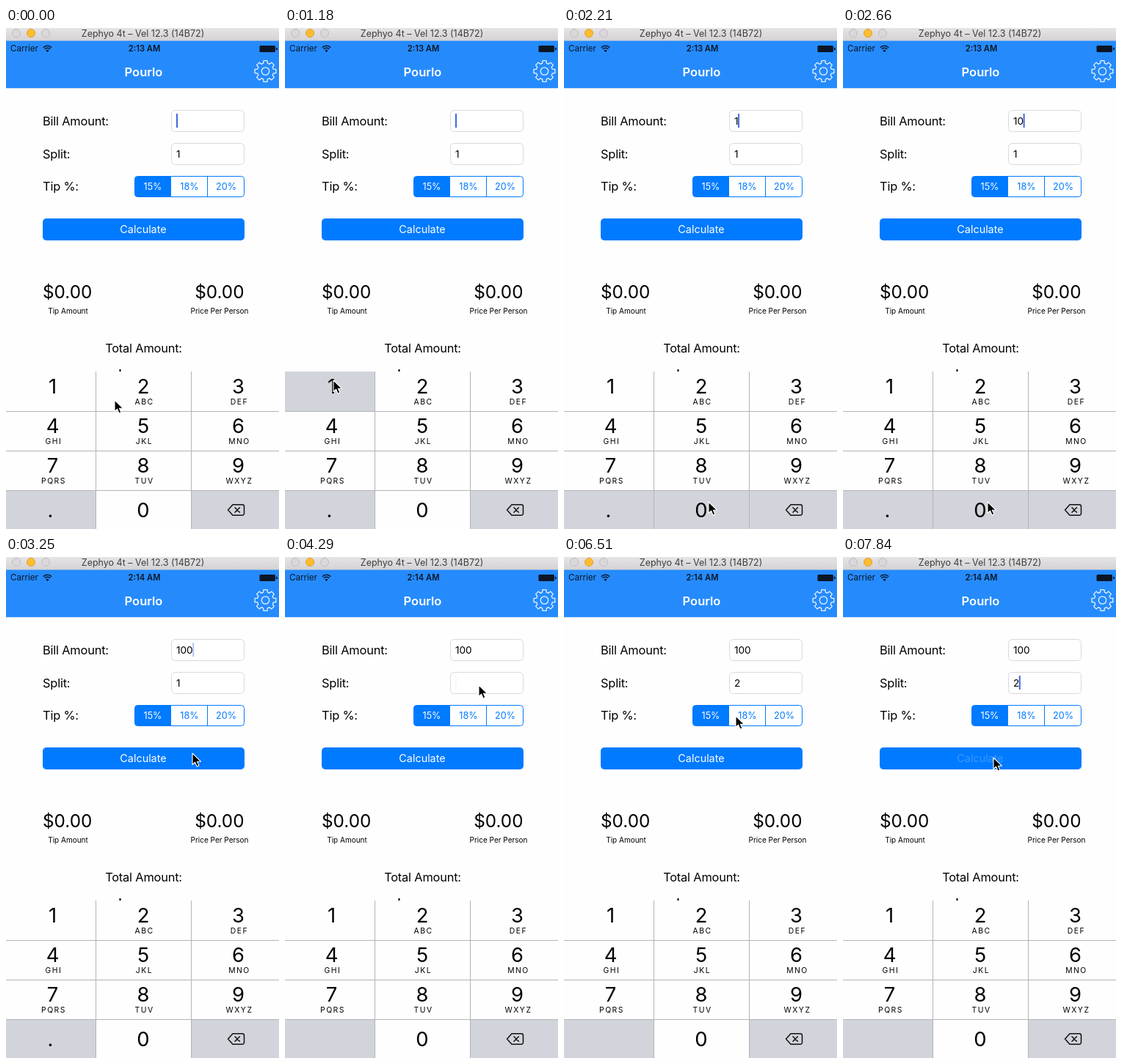
Recreate the animation shown at these times as an HTML page. Size 372x684 px, loop 8 s.

```html
<!DOCTYPE html>
<html lang="en">
<head>
<meta charset="utf-8">
<style>
  html, body { margin: 0; width: 100%; height: 100%; overflow: hidden; background: #fefefe; }
  svg { display: block; width: 372px; height: 684px; font-family: Inter, "Open Sans", sans-serif; }
  .label { font-size: 16.4px; letter-spacing: -.012em; }
  .mid { text-anchor: middle; }
  .box { fill: #fff; stroke: #d9d9d9; }
  .value { font-size: 13.6px; }
  .tab { font-size: 12.6px; fill: #007aff; }
  .money { font-size: 24.3px; }
  .small { font-size: 10px; }
  .digit { font-size: 27.4px; }
  .letters { font-size: 10.4px; letter-spacing: 1.5px; }
</style>
</head>
<body>
<svg viewBox="0 0 372 684">
  <defs>
    <linearGradient id="chrome" x2="0" y2="1">
      <stop stop-color="#e6e4e6"/><stop offset="1" stop-color="#d3d1d3"/>
    </linearGradient>
  </defs>
  <rect width="372" height="684" fill="#fefefe"/>

  <rect width="372" height="18" fill="url(#chrome)"/>
  <g fill="#dad8da" stroke="#bfbdbf">
    <circle cx="14" cy="7" r="5.5"/>
    <circle cx="34" cy="7" r="5.5" fill="#fdbd30" stroke="#e0a028"/>
    <circle cx="54" cy="7" r="5.5"/>
  </g>
  <text class="mid" x="186.5" y="12" font-size="12.5" fill="#3f3f3f">Zephyo 4t – Vel 12.3 (14B72)</text>

  <rect y="17.5" width="372" height="64.5" fill="#258bfd"/>
  <rect y="82" width="372" height=".5" fill="#b4cdea"/>
  <g fill="#0a1626">
    <text x="6" y="32" font-size="11.6">Carrier</text>
    <text id="clock" class="mid" x="188.5" y="32" font-size="11.2" font-weight="600"></text>
    <path d="M56.5 33l-2.1-2.3a3 3 0 0 1 4.2 0z"/>
    <path d="M52.7 28.8a5.4 5.4 0 0 1 7.6 0M50.8 26.7a8 8 0 0 1 11.4 0" fill="none" stroke="#0a1626" stroke-width="1.6"/>
    <rect x="345.5" y="24" width="21.5" height="9" rx="1.5"/>
    <rect x="368" y="26.7" width="1.8" height="3.6" rx=".8"/>
  </g>
  <text class="mid" x="187.5" y="66" font-size="16.5" font-weight="600" fill="#fff">Pourlo</text>
  <g transform="translate(353.5 59)" fill="none" stroke="#e9f3ff" stroke-width="1.3" stroke-linejoin="round">
    <path id="gear"/><circle r="5.2"/>
  </g>

  <g class="label">
    <text x="50" y="133">Bill Amount:</text>
    <text x="50" y="178">Split:</text>
    <text x="50" y="222">Tip %:</text>
    <text class="mid" x="187.5" y="443">Total Amount:</text>
  </g>
  <rect class="box" x="225.5" y="112.5" width="99" height="29" rx="5"/>
  <rect class="box" x="225.5" y="157.5" width="99" height="29" rx="5"/>
  <text id="bill" class="value" x="232" y="132"></text>
  <text id="split" class="value" x="232" y="177"></text>
  <rect id="caret" width="2" height="19" fill="#4268dc"/>

  <rect x="175.5" y="202.5" width="149" height="28" rx="4" fill="#fff" stroke="#007aff"/>
  <path d="M225 202.5h-45.500a4 4 0 0 0-4 4v20a4 4 0 0 0 4 4H225z" fill="#007aff"/>
  <path d="M274.500 203v27" stroke="#007aff"/>
  <g class="tab mid">
    <text x="200" y="221" fill="#fff" style="fill:#fff">15%</text>
    <text x="250" y="221">18%</text>
    <text x="300" y="221">20%</text>
  </g>

  <rect x="50" y="260" width="275" height="30" rx="5" fill="#007aff"/>
  <text id="calc" class="mid" x="187" y="280" font-size="14.4" fill="#fff">Calculate</text>

  <text class="money" x="50" y="369">$0.00</text>
  <text class="money" x="324.500" y="369" text-anchor="end">$0.00</text>
  <g class="small mid">
    <text x="84.500" y="389.500">Tip Amount</text>
    <text x="291" y="389.500">Price Per Person</text>
  </g>
  <rect x="154.500" y="466" width="2" height="3"/>

  <g id="keypad"></g>
  <g fill="none" stroke="#111" stroke-width="1.5" stroke-linejoin="round" stroke-linecap="round">
    <path d="M302.500 658l6.500-7.200h13a2.500 2.500 0 0 1 2.500 2.500v9.400a2.500 2.500 0 0 1-2.500 2.500h-13z"/>
    <path d="M312 654.800l6.400 6.400m0-6.400l-6.400 6.400"/>
  </g>
  <path id="pointer" d="M0 0v15.500l3.600-3.300 2.500 5.700 2.800-1.200-2.500-5.500h5z" stroke="#fff" stroke-width="1.100" stroke-linejoin="round"/>
</svg>
<script>
const LOOP = 8000, STEP = 148.15;
const $ = id => document.getElementById(id);
const GRAY = '#d1d4da';

// pointer stops: time, x, y
const stops = [
  [30, 148, 508], [830, 66, 481], [1330, 66, 481], [2150, 197, 647], [2790, 197, 647],
  [3250, 254, 268], [3640, 276, 175], [3850, 276, 175], [4200, 264, 175], [4800, 264, 175],
  [5480, 165, 478], [5630, 176, 492], [5790, 176, 492], [5920, 183, 395], [6070, 271, 147],
  [6300, 271, 147], [6510, 234, 217], [6740, 219, 217], [7200, 219, 217], [7780, 205, 274]
];
// key presses: key, down, up
const presses = [['1', 1140, 1320], ['0', 2160, 2340], ['0', 2620, 2740], ['2', 5590, 5740]];
const blinkStarts = [-30, 1320, 2340, 2740, 3560, 5900];
const SPLIT_FOCUS = 3800;

function buildGear() {
  const points = [];
  for (let i = 0; i < 8; i++)
    for (const [offset, r] of [[-.26, 11.2], [-.17, 14.6], [.17, 14.6], [.26, 11.2]]) {
      const a = i * Math.PI / 4 + offset;
      points.push((r * Math.cos(a)).toFixed(1) + ' ' + (r * Math.sin(a)).toFixed(1));
    }
  $('gear').setAttribute('d', 'M' + points.join('L') + 'Z');
}

function buildKeypad() {
  const letters = ['', 'ABC', 'DEF', 'GHI', 'JKL', 'MNO', 'PQRS', 'TUV', 'WXYZ'];
  const left = [0, 122.5, 252.5, 372], center = [63.5, 187, 316.5];
  let html = '';
  [...'123456789.0<'].forEach((key, i) => {
    const col = i % 3, y = 469 + 54 * Math.floor(i / 3), last = i > 8;
    html += `<rect id="key${key === '<' ? 'Del' : key}" x="${left[col]}" y="${y}" width="${left[col + 1] - left[col]}" height="54" fill="${last && col !== 1 ? GRAY : '#fefefe'}"/>`;
    if (key !== '<')
      html += `<text ${key === '.' ? 'id="dot"' : ''} class="digit mid" x="${key === '.' ? 60.5 : center[col]}" y="${y + (last ? 36.5 : 30)}">${key}</text>`;
    if (letters[i])
      html += `<text class="letters mid" x="${center[col] + 1.5}" y="${y + 45}">${letters[i]}</text>`;
  });
  html += '<path d="M0 523.5H372M0 577.5H372M0 631.5H372M122.5 469V684M252.5 469V684" stroke="#b3b4b8"/>';
  $('keypad').innerHTML = html;
}

function pointerAt(t) {
  const next = stops.findIndex(s => s[0] > t);
  if (next === 0) return stops[0].slice(1);
  if (next < 0) return stops[stops.length - 1].slice(1);
  const a = stops[next - 1], b = stops[next];
  const p = (t - a[0]) / (b[0] - a[0]), e = p * p * (3 - 2 * p);
  return [a[1] + (b[1] - a[1]) * e, a[2] + (b[2] - a[2]) * e];
}

function caretOpacity(t) {
  const start = blinkStarts.filter(s => s <= t).pop();
  const p = (t - start) % 900;
  if (p < 420) return 1;
  return p < 720 ? Math.max(0, 1 - (p - 420) / 150) : (p - 720) / 180;
}

function draw(t) {
  const inSplit = t >= SPLIT_FOCUS;
  const typed = presses.filter(p => t >= p[2]).map(p => p[0]).join('');
  $('bill').textContent = typed.slice(0, 3);
  $('split').textContent = inSplit ? typed.slice(3) : '1';
  $('clock').textContent = t < 2900 ? '2:13 AM' : '2:14 AM';
  $('dot').style.visibility = inSplit ? 'hidden' : 'visible';

  const field = $(inSplit ? 'split' : 'bill'), caret = $('caret');
  const width = field.textContent ? field.getComputedTextLength() - .5 : 0;
  caret.setAttribute('x', 232 + width);
  caret.setAttribute('y', inSplit ? 162 : 117);
  caret.setAttribute('opacity', caretOpacity(t));

  for (const key of '012') {
    const down = presses.some(p => p[0] === key && t >= p[1] && t < p[2]);
    $('key' + key).setAttribute('fill', down ? GRAY : '#fefefe');
  }
  $('calc').setAttribute('opacity', t < 7800 ? 1 : .22);
  $('pointer').setAttribute('transform', `translate(${pointerAt(t).map(v => Math.round(v))})`);
}

buildGear();
buildKeypad();

// the screen refreshes in coarse steps
function tick() {
  const t = performance.now() % LOOP;
  const step = Math.min(53, Math.floor((t + 16) / STEP));
  draw(Math.max(0, step * STEP - 8));
  requestAnimationFrame(tick);
}
tick();
</script>
</body>
</html>
```
